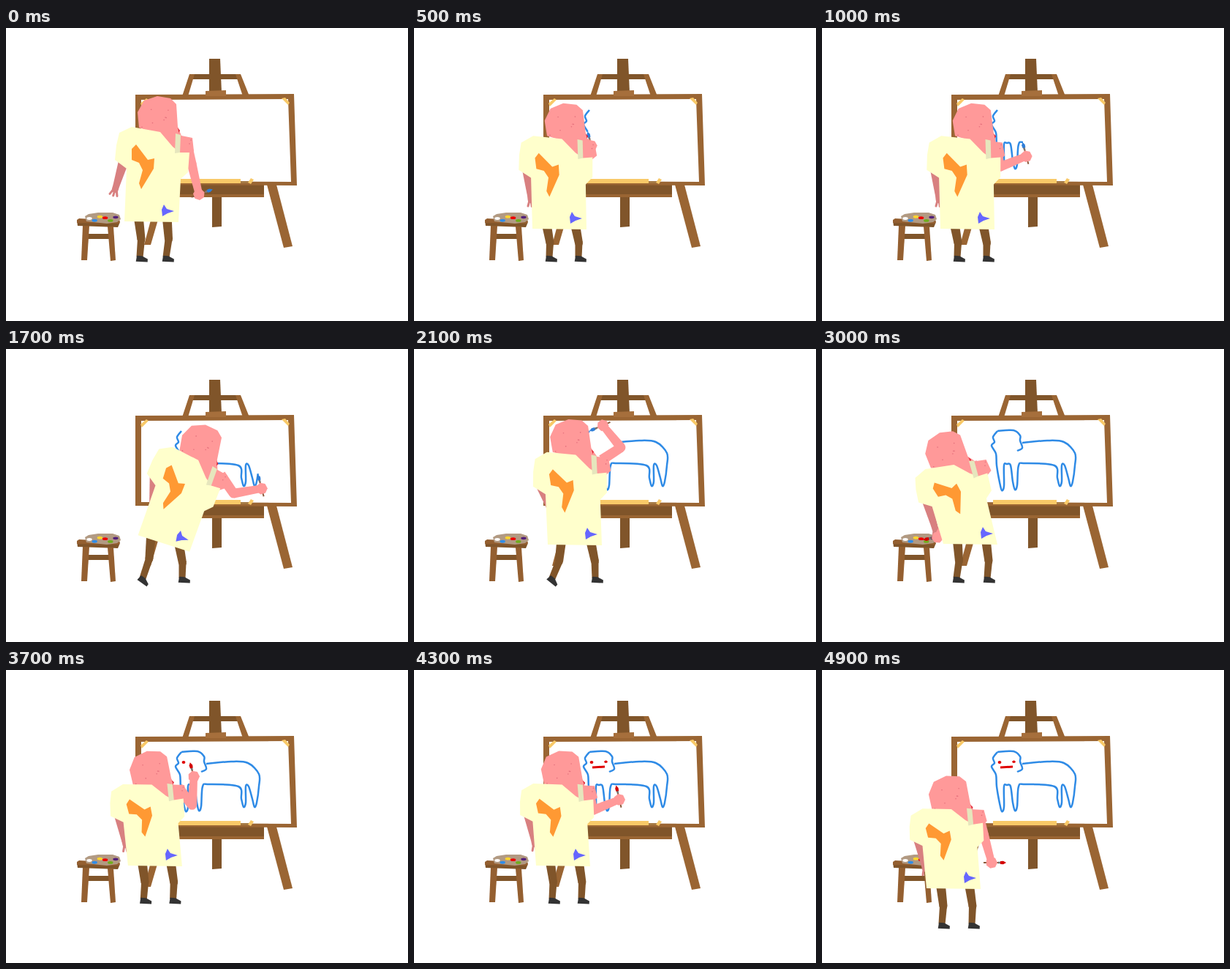
An HTML page that plays this animation: 550 by 400 pixels, repeating every 7000 ms.

```html
<!DOCTYPE html>
<html lang="en">
<head>
<meta charset="utf-8">
<title>Painter at the easel</title>
<style>
html, body { margin: 0; width: 100%; height: 100%; overflow: hidden; background: #fff; }
svg { display: block; width: 550px; height: 400px; }
</style>
</head>
<body>
<svg viewBox="0 0 550 400">
  <g fill="#80552a">
    <path d="M251 63H321L319 70H254Z"/>
    <path d="M278 42H293L295 88H278Z"/>
    <path d="M282 230H295V271L282 272Z"/>
    <path d="M222 214H353V228H222Z"/>
  </g>
  <g fill="#9a6533">
    <path d="M251 63H258L249 93H241Z"/>
    <path d="M314 63H321L333 93H324Z"/>
    <path d="M357 214H370L392 298L380 300Z"/>
    <path d="M211 214H222L198 296H189Z"/>
    <path d="M222 227H353V231H222Z"/>
    <path fill-rule="evenodd" d="M177 91L394 90L398 215L177 214ZM185 98L386 97L390 210L185 209Z"/>
    <path fill="#a66f3c" d="M273 86L301 85V93H273Z"/>
  </g>
  <path fill="#a67a45" d="M321 209H334L332 212H321Z"/>
  <g fill="#f8c968">
    <path d="M234 206H321V212H234Z"/>
    <path d="M331 211L335 205L339 207L335 213Z"/>
    <path d="M184 103L192 96L195 98L186 107Z"/>
    <path d="M377 96L382 95L388 102L386 105Z"/>
  </g>

  <g fill="#80552a">
    <path d="M112 281H141V288H112Z"/>
    <path d="M97 263L156 265L153 272L98 270Z"/>
  </g>
  <g fill="#945f30">
    <path d="M105 270H114L111 317H103Z"/>
    <path d="M139 271H147L150 317L143 318Z"/>
    <path d="M97 262L100 260L156 263L155 267L97 266Z"/>
  </g>
  <path fill="#b29a82" d="M108 257L113 254L126 252H146L155 255L157 261L152 265L138 267L110 264Z"/>
  <g id="paints"></g>

  <g fill="none" stroke="#2f8be6" stroke-width="2.5" stroke-linejoin="round">
    <path id="torso"/>
    <path id="crown"/>
  </g>
  <g fill="#e00000">
    <ellipse id="eyeL" cx="243" cy="126" rx="2.4" ry="1.9"/>
    <ellipse id="eyeR" cx="262.5" cy="125.2" rx="2.2" ry="1.7"/>
    <path id="mouth" fill="none" stroke="#e00000" stroke-width="3" d="M244 133L261 132"/>
  </g>
  <g id="man"></g>
</svg>
<script>
const LOOP = 7000, STEP = 100;
const $ = id => document.getElementById(id);
const rad = a => a * Math.PI / 180;
const mix = (a, b, k) => a + (b - a) * k;
const mixAll = (a, b, k) => a.map((v, i) => mix(v, b[i], k));
const mixPose = (a, b, k) => Object.fromEntries(Object.keys(a).map(n => [n, mix(a[n], b[n], k)]));
const ramp = (t, from, to) => Math.min(1, Math.max(0, (t - from) / (to - from)));
const polar = ([x, y], angle, n) => [x + n * Math.cos(rad(angle)), y + n * Math.sin(rad(angle))];

// Value of a keyed track [[time, value], ...] at time t
function at(track, t, blend) {
  const i = track.findIndex(k => k[0] > t);
  if (i < 0) return track[track.length - 1][1];
  const [a, from] = track[i - 1], [b, to] = track[i];
  return blend(from, to, (t - a) / (b - a));
}

// Smooth curve through points
function curve(p) {
  let d = 'M' + p[0];
  for (let i = 0; i + 1 < p.length; i++) {
    const q = p[i], r = p[i + 1], o = p[i - 1] || q, s = p[i + 2] || r;
    d += `C${q.map((v, j) => v + (r[j] - o[j]) / 6)} ${r.map((v, j) => v - (s[j] - q[j]) / 6)} ${r}`;
  }
  return d;
}

// The animal: outline from the brow over four paws and the back to the neck, then the crown
const paw = (l, r, x, y) => [[l, 159], [x - 3, y - 11], [x, y], [x + 3, y - 6], [r, 159]];
$('torso').setAttribute('d', curve([[240, 112], [234, 120], [236, 127], [232, 132], [238, 143],
  ...paw(239, 249, 246, 193), [253, 157], ...paw(258, 269, 264, 192), [278, 156],
  ...paw(318, 328, 325, 187), ...paw(332, 346, 340, 187),
  [346, 142], [331, 127], [308, 125], [274, 128]]));
$('crown').setAttribute('d', curve([[240, 112], [262, 111], [271, 118], [271, 125], [274, 135], [267, 139]]));

['#fff', '#2f8ce8', '#ffd52e', '#e00', '#6fae1c', '#52207a'].forEach((c, i) => {
  $('paints').innerHTML += `<ellipse cx="${114 + 7.2 * i}" cy="${260 + 3 * Math.sin(2 * i)}" rx="3.7" ry="1.9" fill="${c}"/>`;
});

// x, y: middle of the hem; lean: turn of the trunk; tall: trunk height; nod: head shift;
// arm: angle of the back arm; left, right: ankles
const pose = (x, y, lean, tall, nod, arm, left, right, floor = 313) =>
  ({ x, y, lean, tall, nod, arm, left, right, floor });
const rest = pose(199, 264, 0, 1, 0, 107, 183, 219);
const paint = pose(199, 274, -4, 1, 9, 83, 185, 225);
const reach = pose(216, 265, 17, 1, 0, 95, 187, 241);
const side = pose(220, 267, -5, 1, -2, 68, 189, 248);
const dip = pose(203, 266, -18, .9, -2, 74, 184, 226);
const touch = pose(204, 267, -7, .9, 5, 78, 189, 229);
const look = pose(180, 298, -8, .88, 3, 77, 164, 205, 347);
const stride = mixPose(side, reach, .25);

const body = [[0, rest], [500, paint], [1000, paint], [1200, stride], [1300, stride],
  [1700, reach], [1800, reach], [2100, side], [2400, side], [2900, dip], [3100, dip],
  [3800, touch], [4500, touch], [4900, look]];

// Brush hand: x, y, brush direction
const hand = [[0, [264, 227, -20]], [200, [294, 185, -60]], [400, [245, 131, -105]],
  [1800, [352, 155, -105]], [2100, [258, 104, -203]], [2600, [286, 131, -203]],
  [2900, [152, 250, -190]], [3000, [158, 257, -190]], [3200, [158, 257, -190]],
  [3600, [248, 145, -105]], [3800, [266, 146, -105]], [3900, [249, 152, -105]],
  [4100, [266, 151, -105]], [4300, [281, 177, -103]], [4500, [281, 177, -103]], [4900, [232, 263, 0]]];

const torsoInk = [[0, 0], [400, 0], [1000, .444], [1200, .53], [1400, .545], [2000, 1]];

const SKIN = '#ff9999', SHADE = '#d88080', CLOTH = '#ffffcc', TROUSER = '#80552a';
// Trunk parts are measured from the middle of the hem
const APRON = [[-34, -72], [-50, -84], [-48, -104], [-44, -121], [-27, -129], [12, -122], [29, -102],
  [39, -94], [52, -94], [50, -67], [40, -58]];
const STRAP = [[33, -120], [40, -118], [39, -94], [32, -93]];
const COLLAR = [[41, -117], [56, -114], [58, -96], [44, -86], [28, -98]];
const STAIN = [[0, 0], [-6, 6], [-6, 21], [4, 25], [9, 35], [4, 53], [7, 61], [24, 33], [25, 19], [16, 21]];
const HEAD = [[-28, -5], [-19, -21], [-1, -27], [17, -24], [25, -16], [27, 15], [29, 26], [20, 44], [5, 32],
  [-10, 22], [-26, 16]];
const SPOT = [[-4, -9], [0, -3], [10, 0], [1, 3], [-6, 7], [-7, -2]];
const SHOE = [[-4, -2], [3, -2], [11, 2], [11, 6], [-5, 6]];
const FIST = Array.from({ length: 7 }, (_, i) => polar([0, 0], i * 360 / 7, 8));

let seed = 7;
const rnd = () => (seed = seed * 16807 % 2147483647) / 2147483647;
const FRECKLES = Array.from({ length: 7 }, () => [-22 + 44 * rnd(), -16 + 34 * rnd()]);

const fmt = v => v.toFixed(1);
const poly = (pts, fill) => `<path fill="${fill}" d="M${pts.map(p => p.map(fmt)).join('L')}Z"/>`;
const dot = ([x, y], r, fill) => `<circle cx="${fmt(x)}" cy="${fmt(y)}" r="${r}" fill="${fill}"/>`;
const line = (a, b, w, c, cap = 'butt') =>
  `<path stroke="${c}" stroke-width="${w}" stroke-linecap="${cap}" d="M${a.map(fmt)}L${b.map(fmt)}"/>`;

function place(pts, [x, y], turn, tall = 1) {
  const c = Math.cos(rad(turn)), s = Math.sin(rad(turn));
  return pts.map(([a, b]) => [x + a * c - b * tall * s, y + a * s + b * tall * c]);
}

function limb(a, b, w1, w2, fill) {
  const side = Math.atan2(b[1] - a[1], b[0] - a[0]) * 180 / Math.PI + 90;
  return poly([polar(a, side, w1 / 2), polar(b, side, w2 / 2),
    polar(b, side, -w2 / 2), polar(a, side, -w1 / 2)], fill);
}

function bend(a, b, upper, fore) {
  const dx = b[0] - a[0], dy = b[1] - a[1], n = Math.hypot(dx, dy);
  if (n >= upper + fore) return mixAll(a, b, upper / (upper + fore));
  const k = (upper * upper - fore * fore + n * n) / (2 * n);
  const h = Math.sqrt(Math.max(0, upper * upper - k * k));
  return [a[0] + (dx * k - dy * h) / n, a[1] + (dy * k + dx * h) / n];
}

function leg(hip, foot) {
  const [x, y] = mixAll(hip, foot, .5), knee = [x + 3, y];
  const turn = Math.max(3, 3 * (hip[0] - foot[0]));
  return limb([hip[0], hip[1] - 8], knee, 13, 11, TROUSER) + dot(knee, 5.4, TROUSER) +
    limb(knee, foot, 10, 9, TROUSER) + poly(place(SHOE, foot, turn), '#333');
}

function backArm(from, angle) {
  const wrist = polar(from, angle, 35);
  return limb(from, wrist, 14, 9, SHADE) + line(wrist, polar(wrist, angle, 5), 9, SHADE, 'round') +
    [-22, 0, 22].map(k => line(wrist, polar(wrist, angle + k, 14), 3, SHADE, 'round')).join('');
}

function frontArm(from, [x, y, turn], ink) {
  const grip = [x, y], elbow = bend(from, grip, 31, 39);
  const [tail, ring, neck] = place([[-11, 0], [9, 0], [13, 0]], grip, turn);
  return line(tail, neck, 2, '#8b5a3a') + line(ring, neck, 2.6, '#777') +
    poly(place([[12, -2], [16, -2.3], [20, 0], [16, 2.3], [12, 2]], grip, turn), ink) +
    limb(from, elbow, 14, 13, SKIN) + dot(elbow, 6.4, SKIN) +
    limb(elbow, grip, 13, 10, SKIN) + poly(place(FIST, grip, turn), SKIN);
}

function drawMan(p, grip, ink) {
  const base = [p.x, p.y], sway = Math.max(0, p.lean), tilt = p.lean * .9;
  const trunk = pts => place(pts, base, p.lean, p.tall);
  const hem = pts => place(pts, base, sway);
  const [shoulder, sleeve, stainAt, crown] = trunk([[47, -112], [-38, -82], [-21, -105], [9, -144]]);
  const [hipL, hipR, spotAt] = hem([[-18, 0], [21, 0], [21, -14]]);
  const head = pts => place(pts, [crown[0] + p.nod, crown[1]], tilt);
  $('man').innerHTML =
    backArm(sleeve, p.arm) +
    leg(hipL, [p.left, p.floor]) + leg(hipR, [p.right, p.floor]) +
    frontArm(shoulder, grip, ink) +
    poly([...head([[-10, 20], [27, 15]]), ...trunk(COLLAR)], SKIN) +
    poly(head([[26, 15], [30, 20], [27, 25]]), '#e02030') +
    poly(head(HEAD), SKIN) +
    [...head(FRECKLES), ...trunk([[52, -106], [54, -111]])].map(q => dot(q, .8, '#e46f7c')).join('') +
    poly([...trunk(APRON), ...hem([[37, 1], [-37, 0]])], CLOTH) +
    poly(trunk(STRAP), '#e6e6bd') +
    poly(place(STAIN, stainAt, p.lean + Math.min(0, p.lean) * .8, p.tall), '#ff9933') +
    poly(place(SPOT, spotAt, sway), '#6666ff');
}

// Shows a share of a line and returns the point where it ends
function trace(path, share) {
  const n = path.getTotalLength();
  path.setAttribute('stroke-dasharray', `${n * share} ${n + 9}`);
  path.style.display = share > 0 ? '' : 'none';
  const { x, y } = path.getPointAtLength(n * share);
  return [x, y];
}

function draw(t) {
  const torsoEnd = trace($('torso'), at(torsoInk, t, mix));
  const crownEnd = trace($('crown'), ramp(t, 2100, 2600));
  trace($('mouth'), ramp(t, 3900, 4100));
  $('eyeL').style.display = t >= 3700 ? '' : 'none';
  $('eyeR').style.display = t >= 3800 ? '' : 'none';

  let grip = at(hand, t, mixAll);
  const turn = grip[2];
  if (t >= 400 && t <= 2000) grip = [...polar(torsoEnd, turn, -20), turn];
  if (t >= 2100 && t <= 2600) grip = [...polar(crownEnd, turn, -20), turn];
  drawMan(at(body, t, mixPose), grip, t < 3000 ? '#2f7fd8' : '#d40000');
}

const start = performance.now();
let shown = -1;
function tick() {
  const t = Math.floor((performance.now() - start) % LOOP / STEP) * STEP;
  if (t !== shown) draw(shown = t);
  requestAnimationFrame(tick);
}
tick();
</script>
</body>
</html>
```
